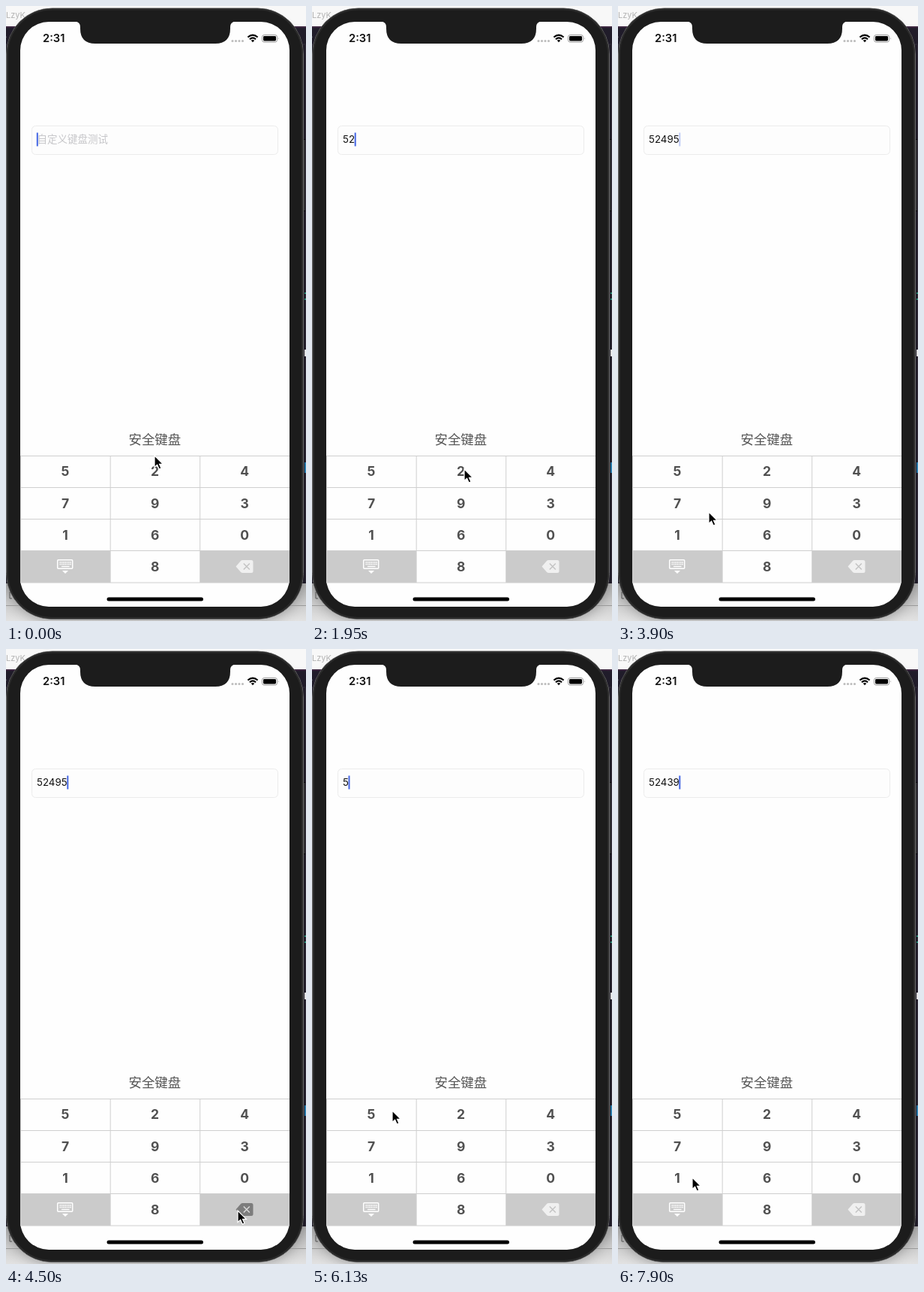
These frames come from a looping animation (400 by 818 pixels, 8000 ms). An HTML page:

```html
<!DOCTYPE html>
<html lang="zh">
<head>
<meta charset="utf-8">
<style>
  html, body { margin: 0; width: 100%; height: 100%; overflow: hidden; background: #fff; }
  svg { display: block; width: 400px; height: 818px; }
  text { font-family: Inter, "Noto Sans CJK SC", "Noto Sans CJK", sans-serif; }
</style>
</head>
<body>
<svg viewBox="0 0 400 818">
  <defs>
    <linearGradient id="floor" x1="0" y1="0" x2="0" y2="1">
      <stop offset="0" stop-color="#b4b4b4"/><stop offset="1" stop-color="#e2e2e2"/>
    </linearGradient>
    <filter id="blur" x="-20%" y="-20%" width="140%" height="140%"><feGaussianBlur stdDeviation="9"/></filter>
  </defs>

  <!-- desktop behind the phone -->
  <rect width="400" height="27" fill="#f8f8f8"/>
  <text x="0" y="16" font-size="11" fill="#b4b4b4">LzyK</text>
  <rect y="27" width="400" height="741" fill="#211d2b"/>
  <path d="M0 28H400" stroke="#3c2740" stroke-width="2"/>
  <path d="M0 51H400" stroke="#34303e"/>
  <text x="-5" y="45" font-size="10" fill="#ddd">e</text>
  <rect x="394" y="177" width="6" height="95" fill="#333236"/>
  <path d="M394 177.500h6m-6 95h6M0 117.500h3m-3 63h3m-3 54h3m-3 66h3" stroke="#000"/>
  <path d="M399.500 52V768" stroke="#36313f"/>
  <rect y="768" width="400" height="50" fill="url(#floor)"/>
  <rect x="2" y="20" width="394" height="798" rx="62" opacity=".3" filter="url(#blur)"/>
  <path d="M0 797.500H400" stroke="#999"/>
  <path d="M8 779H5V788H8" fill="none" stroke="#555"/>
  <g id="code"></g>

  <!-- phone -->
  <rect x=".5" y="3" width="396" height="812.500" rx="61" fill="#1c1c1c" stroke="#6a6a6a"/>
  <rect x="2" y="4.500" width="393" height="809.500" rx="59.500" fill="none" stroke="#2b2b2b" stroke-width="2"/>
  <rect x="19" y="21" width="359" height="778" rx="38" fill="#fefefe"/>
  <path d="M92 20.500Q99 21 99 28V30Q99 50 119 50H279Q299 50 299 30V28Q299 21 306 20.500Z" fill="#1c1c1c"/>

  <!-- status bar -->
  <text x="49" y="48.300" font-size="14.700" font-weight="600" fill="#111">2:31</text>
  <path d="M302 46.500h0m4.500 0h0m4.500 0h0m4.500 0h0" stroke="#bdbdbd" stroke-width="3.200" stroke-linecap="round"/>
  <g fill="none" stroke="#000" stroke-width="2">
    <path d="M322.400 41.600Q329 35.600 335.600 41.600M324.900 44.200Q329 40.600 333.100 44.200"/>
  </g>
  <path d="M326.700 45.800Q329 44 331.300 45.800L329 48.200Z"/>
  <rect x="341.500" y="38.500" width="20" height="9.500" rx="2.700" fill="none" stroke="#999"/>
  <rect x="343" y="40" width="17" height="6.500" rx="1.400"/>
  <path d="M363 41.700Q364.600 43.200 363 44.800Z" fill="#999"/>

  <!-- input -->
  <rect x="34.500" y="159.500" width="328" height="38" rx="5" fill="#fdfdfd" stroke="#ececec"/>
  <text id="hint" x="41.500" y="182.300" font-size="13.500" fill="#c6c6c9">自定义键盘测试</text>
  <text id="typed" x="41" y="182.300" font-size="13.300" fill="#111"></text>
  <rect id="caret" y="168.500" width="2" height="18" fill="#4466e4"/>

  <!-- keypad -->
  <text x="198.300" y="583" font-size="17.400" text-anchor="middle" fill="#555">安全键盘</text>
  <path d="M19 725H139V767H19ZM259 725H378V767H259Z" fill="#cbcbcb"/>
  <path d="M19 598.500H378M19 640.500H378M19 682.500H378M19 724.500H378M19 767H378M139.200 598V767M258.700 598V767M19.500 598V767" stroke="#cfcfcf"/>
  <g id="keys" font-size="17.500" font-weight="700" text-anchor="middle" fill="#505050"></g>
  <rect x="68.700" y="736.700" width="20" height="11.500" rx="1" fill="none" stroke="#fff" stroke-width="1.500"/>
  <path d="M71.500 740H87M71.500 742.500H87" stroke="#fff" stroke-width="1.500" stroke-dasharray="1.600 .7"/>
  <path d="M74 745.500H84.500" stroke="#fff" stroke-width="1.300"/>
  <path d="M75 751H83L79 755Z" fill="#fff"/>
  <path id="erase" d="M306.500 745.500L313 738Q314 737 315.500 737H327Q329.500 737 329.500 739.500V751.500Q329.500 754 327 754H315.500Q314 754 313 753Z"/>
  <path id="cross" d="M316.800 741.500l8 8m0-8l-8 8" stroke-width="1.500"/>
  <rect x="134.500" y="786.500" width="128.500" height="5" rx="2.500"/>

  <path id="arrow" d="M0 0V15.500L3.600 12.300L6.200 18L9 16.800L6.500 11.300H11.300Z" stroke="#fff" stroke-width="1.200"/>
</svg>
<script>
const $ = id => document.getElementById(id);
const LOOP = 8000, DIGIT = 8.2;

[..."5247931608"].forEach((d, i) => {
  const col = i < 9 ? i % 3 : 1, row = Math.floor(i / 3);
  $("keys").innerHTML += `<text x="${79 + col * 119.6}" y="${625.3 + row * 42.2}">${d}</text>`;
});

// slivers of editor text beside the phone: x, y, height, colour
[[0, 103, 9, "#b0308c"], [0, 153, 9, "#ccc"], [0, 330, 5, "#b0308c"], [0, 363, 4, "#b0308c"],
 [0, 456, 11, "#c9803f"], [0, 481, 8, "#2c8f94"], [0, 533, 10, "#a8703a"], [0, 586, 9, "#1f9a70"],
 [0, 610, 9, "#1f9a70"], [0, 636, 8, "#1f9a70"], [0, 660, 8, "#2c7f9a"], [0, 711, 9, "#ccc"],
 [398, 381, 2, "#2c8f78"], [398, 389, 2, "#2c8f78"], [398, 457, 9, "#ddd"], [398, 607, 14, "#2878a8"]
].forEach(([x, y, h, c]) => $("code").innerHTML += `<rect x="${x}" y="${y}" width="2" height="${h}" fill="${c}"/>`);

// pointer stops: step, x, y
const stops = [
  [0, 198, 598], [3, 112, 711], [4, 100, 705], [7, 99, 620], [10, 99, 620], [12, 203, 616], [13, 203, 616],
  [15, 318, 618], [16, 318, 618], [18, 196, 656], [19, 172, 639], [21, 97, 622], [23, 97, 622],
  [26, 121, 673], [29, 308, 747], [30, 309, 747], [38, 309, 746], [40, 108, 614], [41, 107, 614],
  [43, 205, 612], [44, 205, 612], [46, 312, 620], [48, 311, 655], [50, 197, 662], [52, 108, 697], [53, 99, 703]
];

// field contents from a given step on
const edits = [
  [-1, ""], [10, "5"], [12, "52"], [16, "524"], [18, "5249"], [22, "52495"], [31, "5249"], [32, "524"],
  [33, "52"], [35, "5"], [38, ""], [41, "5"], [44, "52"], [46, "524"], [48, "5243"], [50, "52439"]
];
const erasing = [30, 32, 34, 37];

const stepAt = t => t < 4800 ? Math.floor(t / 150) : 32 + Math.floor((t - 4800) / 147.6 + 0.06);
const timeOf = k => k < 32 ? k * 150 : 4800 + (k - 32) * 147.6;

function pointer(k) {
  const i = stops.findIndex(s => s[0] >= k);
  if (i < 1) return stops[0].slice(1);
  const [k0, x0, y0] = stops[i - 1], [k1, x1, y1] = stops[i];
  const u = (k - k0) / (k1 - k0), e = u * u * (3 - 2 * u);
  return [x0 + (x1 - x0) * e, y0 + (y1 - y0) * e];
}

function caretAlpha(age) {
  const a = age % 1000;
  const clamp = v => Math.max(0, Math.min(1, v));
  return a < 800 ? clamp((650 - a) / 150) : clamp((a - 800) / 150);
}

function draw(t) {
  const k = Math.min(stepAt(t), 53);
  const [since, value] = edits.filter(e => e[0] <= k).pop();
  const pressed = erasing.includes(k);
  $("typed").textContent = value;
  $("hint").setAttribute("visibility", value ? "hidden" : "visible");
  $("caret").setAttribute("x", 40.8 + value.length * DIGIT - (value ? 0.5 : 0));
  $("caret").setAttribute("opacity", caretAlpha(timeOf(k) - timeOf(since)));
  $("erase").setAttribute("fill", pressed ? "#7d7d7d" : "#f0f0f0");
  $("cross").setAttribute("stroke", pressed ? "#d8d8d8" : "#c4c4c4");
  $("arrow").setAttribute("transform", `translate(${pointer(k)})`);
}

function tick() {
  draw(performance.now() % LOOP);
  requestAnimationFrame(tick);
}
tick();
</script>
</body>
</html>
```
